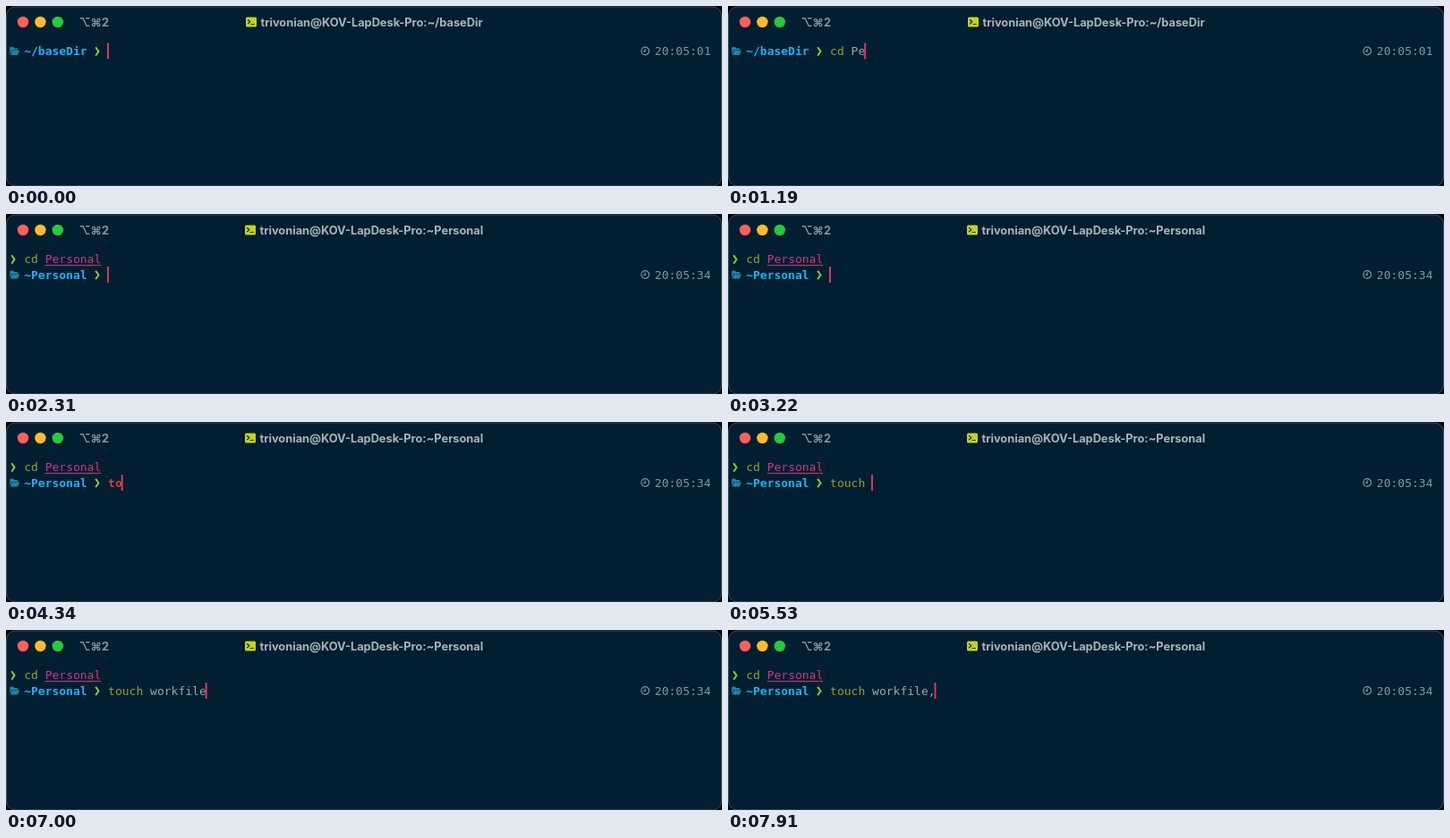
These frames come from a looping animation (800x202 px, 8 s). An HTML page with a canvas:

```html
<!DOCTYPE html>
<html lang="en">
<head>
<meta charset="utf-8">
<title>Terminal</title>
<style>
  html, body { margin: 0; width: 100%; height: 100%; overflow: hidden; background: #000; }
  canvas { display: block; }
</style>
</head>
<body>
<canvas id="stage" width="800" height="202"></canvas>
<script>
const ctx = document.getElementById('stage').getContext('2d');
const LOOP = 8000, LEFT = 4.5, CELL = 7.83, ENTER = 1960;
const ROW_1 = 50.5, ROW_2 = 68;
const MONO = '13px "DejaVu Sans Mono", monospace';
const SANS = '12.8px Inter, "DejaVu Sans", sans-serif';
const HOST = 'trivonian@KOV-LapDesk-Pro:';
const COLOR = {
  back: '#011f31', edge: '#3c5262', title: '#aab4ba', dim: '#84949e', text: '#9ba7ab',
  path: '#22b0fa', folder: '#1a87ad', arrow: '#86cf35', valid: '#9aa324',
  invalid: '#d84044', argument: '#cc387f', cursor: '#d23a5c', badge: '#c6d40f'
};

// Time at which each character of a command appears.
const firstKeys = [350, 490, 700, 980, 1120, 1260, 1330, 1400, 1470, 1540, 1610];
const secondKeys = [3990, 4200, 4480, 4690, 4900, 5250,
  5740, 5880, 6090, 6230, 6440, 6580, 6720, 6930, 7490];
const typed = (command, keys, t) => command.slice(0, keys.filter(k => k <= t).length);
const column = n => LEFT + n * CELL;

function write(text, x, y, color, weight = 'normal', font = MONO) {
  ctx.font = weight + ' ' + font;
  ctx.fillStyle = color;
  ctx.fillText(text, x, y);
}

function stroke(d, x, y, color, width) {
  ctx.save();
  ctx.translate(x, y);
  ctx.strokeStyle = color;
  ctx.lineWidth = width;
  ctx.stroke(new Path2D(d));
  ctx.restore();
}

function fill(d, x, y, color) {
  ctx.save();
  ctx.translate(x, y);
  ctx.fillStyle = color;
  ctx.fill(new Path2D(d));
  ctx.restore();
}

function roundBox(x, y, w, h, r) {
  ctx.beginPath();
  ctx.roundRect(x, y, w, h, r);
}

function drawWindow(directory, shift) {
  ctx.fillStyle = '#000';
  ctx.fillRect(0, 0, 800, 202);
  roundBox(0.5, 1, 799, 201, 10);
  ctx.fillStyle = COLOR.back;
  ctx.fill();
  ctx.strokeStyle = COLOR.edge;
  ctx.lineWidth = 1;
  ctx.stroke();

  ['#ff5f57', '#febc2e', '#28c840'].forEach((color, i) => {
    ctx.beginPath();
    ctx.arc(19 + i * 19.4, 18, 6.2, 0, 7);
    ctx.fillStyle = color;
    ctx.fill();
  });
  write('⌥⌘2', 81.5, 23, COLOR.dim, '700', SANS);

  roundBox(268 - shift, 12.5, 12, 11, 1.5);
  ctx.fillStyle = COLOR.badge;
  ctx.fill();
  stroke('M2.2 2.8L4.7 5.2L2.2 7.6M5.8 8H9.5', 268 - shift, 12.5, COLOR.back, 1.2);
  write(HOST + directory, 284.5 - shift, 23, COLOR.title, '700', SANS);
}

function drawArrow(col, y) {
  stroke('M1.7 -4.8L5 0L1.7 4.8', column(col), y + 0.5, COLOR.arrow, 2);
}

function drawCommand(command, col, y) {
  const [name, argument = ''] = command.split(' ');
  const known = name === 'cd' || name === 'touch';
  write(name, column(col), y + 4.5, known ? COLOR.valid : COLOR.invalid, known ? 'normal' : 'bold');
  const start = column(col + name.length + 1);
  const exists = argument === 'Personal';
  write(argument, start, y + 4.5, exists ? COLOR.argument : COLOR.text);
  if (exists) ctx.fillRect(start, y + 6.5, argument.length * CELL, 1);
}

function drawPrompt(directory, command, clock, y) {
  fill('M0 3V-4Q0 -5 1 -5H3.5L5 -3.6H8Q9 -3.6 9 -2.6V-1.4H2.4Z' +
       'M.4 4L2.8 -.9H10.8L8.6 4Z', 4.3, y + 0.5, COLOR.folder);
  write(directory, column(2), y + 4.5, COLOR.path, 'bold');
  drawArrow(12, y);
  drawCommand(command, 14, y);
  ctx.fillStyle = COLOR.cursor;
  ctx.fillRect(column(14 + command.length) - 1.1, y - 9, 2, 18);

  stroke('M4.5 0A4.3 4.3 0 1 1 -4.1 0A4.3 4.3 0 1 1 4.5 0M.2 -2.6V.4H-2', 714, y, COLOR.dim, 1.2);
  write(clock, column(92), y + 4.5, COLOR.dim);
}

function draw(now) {
  const t = now % LOOP;
  if (t < ENTER) {
    drawWindow('~/baseDir', 0);
    drawPrompt('~/baseDir', typed('cd Personal', firstKeys, t), '20:05:01', ROW_1);
  } else {
    drawWindow('~Personal', 1);
    drawArrow(0, ROW_1);
    drawCommand('cd Personal', 2, ROW_1);
    drawPrompt('~Personal', typed('touch workfile,', secondKeys, t), '20:05:34', ROW_2);
  }
  requestAnimationFrame(draw);
}
requestAnimationFrame(draw);
</script>
</body>
</html>
```
